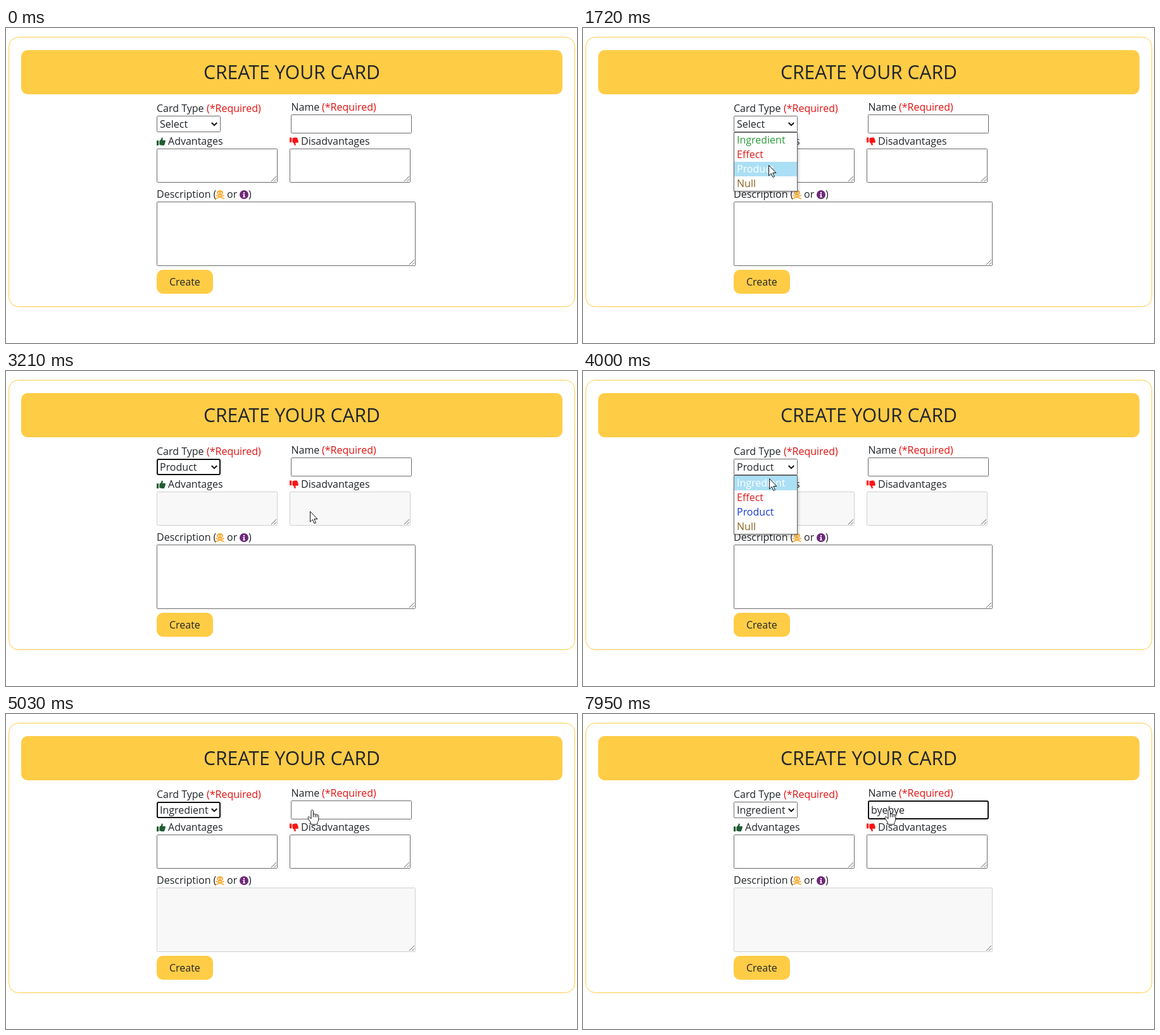
These frames come from a looping animation (902x499 px, 8000 ms). An HTML page:

```html
<!DOCTYPE html>
<html lang="en">
<head>
<meta charset="utf-8">
<title>Create your card</title>
<style>
html, body { margin: 0; height: 100%; overflow: hidden; background: #fff; }
svg { display: block; width: 902px; height: 499px; font: 16px "Open Sans", sans-serif; fill: #212529; }
.yellow { fill: #ffcc46; }
.red { fill: #e31212; }
.field { fill: #fff; stroke: #6b6b6b; }
.field.disabled { fill: #f8f8f8; stroke: #d0d0d0; }
.field.focus { stroke: #101014; stroke-width: 2; }
.grip { fill: none; stroke: #555; stroke-width: .9; }
.cursor { fill: #fff; stroke: #111; stroke-linejoin: round; }
</style>
</head>
<body>
<svg viewBox="0 0 902 499">
  <defs>
    <path id="thumb" d="M0 5.3h3.2V13H0zM4.4 6 7.1 3.3 7.8.4C9.5.2 10 1.4 9.8 2.6L9 4.8h3.8c1.3.2 1.5 1.6.7 2.2.4.9.1 1.7-.4 2 .2 1-.1 1.6-.7 1.9.1 1.2-.5 2.1-1.8 2.1H8.3C6.8 13 5.8 12.2 4.4 12z"/>
    <path id="grip" class="grip" d="M-10-2l8-8M-5.5-2l3.5-3.5"/>
  </defs>

  <rect x="4.5" y="14.5" width="894" height="427" rx="15" fill="#fff" stroke="#ffcc46"/>
  <rect class="yellow" x="24" y="35" width="855" height="70" rx="10"/>
  <text x="451.5" y="81" font-size="30.1" text-anchor="middle">CREATE YOUR CARD</text>

  <text x="238" y="133">Card Type</text>
  <text x="317" y="133" class="red">(*Required)</text>
  <text x="450.5" y="131">Name</text>
  <text x="499" y="131" class="red">(*Required)</text>

  <use href="#thumb" transform="translate(238 173)" fill="#1f5c33"/>
  <text x="256" y="185">Advantages</text>
  <use href="#thumb" transform="translate(448 186.5) scale(1 -1)" fill="#fb1414"/>
  <text x="466" y="185">Disadvantages</text>

  <text x="238" y="269">Description (</text>
  <g transform="translate(331 257)">
    <path d="M1 8.2l12 5M13 8.2l-12 5" stroke="#f8b040" stroke-width="2" stroke-linecap="round"/>
    <path d="M7 0c3.2 0 5 1.8 5 4 0 1.5-.8 2.5-2 3.2v1.3H4V7.200C2.800 6.500 2 5.500 2 4c0-2.200 1.800-4 5-4z" fill="#f8b040"/>
    <circle cx="5" cy="4.300" r="1.100" fill="#fff"/><circle cx="9" cy="4.300" r="1.100" fill="#fff"/>
  </g>
  <text x="349" y="269">or</text>
  <circle cx="376" cy="264" r="7" fill="#6e2a78"/>
  <path d="M375 260h2v2h-2zM374 263h3v4h1v1.300h-4V267h1.200v-2.700H374z" fill="#fff"/>
  <text x="383" y="269">)</text>

  <rect id="advantages" class="field" x="238.500" y="191.500" width="190" height="53" rx="1"/>
  <rect id="disadvantages" class="field" x="448.500" y="191.500" width="190" height="53" rx="1"/>
  <rect id="description" class="field" x="238.500" y="275.500" width="408" height="101" rx="1"/>
  <use href="#grip" x="429" y="245"/>
  <use href="#grip" x="639" y="245"/>
  <use href="#grip" x="647" y="377"/>

  <rect id="name" class="field"/>
  <text id="typed" x="455" y="158"></text>
  <rect id="caret" y="142" width="1" height="20"/>

  <rect id="select" class="field"/>
  <text id="choice" x="243" y="158"></text>
  <path d="M324.800 150l4.200 4.200 4.200-4.200" fill="none" stroke="#111" stroke-width="2"/>

  <rect class="yellow" x="238" y="383" width="89" height="38" rx="10"/>
  <text x="258" y="408">Create</text>

  <g id="list" style="filter: drop-shadow(1px 2px 2px #0004)">
    <rect x="238.500" y="165.500" width="100" height="93" fill="#fff" stroke="#666"/>
    <rect id="highlight" x="239" width="99" height="23" fill="#abdff5"/>
    <g id="options"></g>
  </g>

  <path id="arrow" class="cursor" d="M.5.500v16.500l3.800-3.600 2.700 6.100 2.500-1.100-2.700-5.900h5.200z"/>
  <path id="hand" class="cursor" d="M-2 1.600C-2-.500 1.400-.500 1.400 1.600V7.500c0-1.800 3-1.800 3 .3 0-1.600 2.800-1.400 2.800.600 0-1.400 2.600-1.200 2.600.900V15c0 3-2 4-2 6v2h-10.300v-2c0-2-4-6-4.500-8.500-.4-1.800 1.500-2.400 2.800-1L-2 14zM1.400 7.500v4M4.400 8v3.500M7.200 8.600v3"/>
</svg>
<script>
const LOOP = 8000;
const $ = id => document.getElementById(id);
const options = [["Ingredient", "#2a9a3a"], ["Effect", "#dc1c1c"], ["Product", "#1c3cd8"], ["Null", "#8c6420"]];
const optionTexts = options.map(([label], i) => {
  const text = document.createElementNS("http://www.w3.org/2000/svg", "text");
  text.textContent = label;
  text.setAttribute("x", 243);
  text.setAttribute("y", 183 + 23 * i);
  return $("options").appendChild(text);
});

// Pointer stops: time, x, y
const path = [
  [200, 390, 505], [970, 323, 162], [1110, 320, 159], [1280, 318, 160],
  [1850, 289, 225], [2530, 289, 225], [3140, 480, 222], [3530, 480, 222],
  [3800, 300, 153], [3880, 298, 155], [4000, 294, 170], [4210, 292, 178],
  [4350, 292, 178], [5030, 484, 152], [LOOP, 484, 152]
];
const keyTimes = [6570, 6710, 6900, 7160, 7300, 7430];
const between = (t, from, to) => t >= from && t < to;
const show = (id, visible) => $(id).style.display = visible ? "" : "none";

function set(id, attributes) {
  for (const key in attributes) $(id).setAttribute(key, attributes[key]);
}

function pointerAt(t) {
  const i = Math.max(1, path.findIndex(stop => stop[0] > t));
  const [t0, x0, y0] = path[i - 1], [t1, x1, y1] = path[i];
  const u = Math.min(1, Math.max(0, (t - t0) / (t1 - t0)));
  const k = u * u * (3 - 2 * u);
  return [Math.round(x0 + (x1 - x0) * k), Math.round(y0 + (y1 - y0) * k)];
}

// The focus ring lies inside the outer edge of the thin border.
function drawBox(id, x, y, width, height, focused) {
  const inset = focused ? 1 : .5;
  set(id, {
    x: x + inset, y: y + inset, width: width - 2 * inset, height: height - 2 * inset,
    rx: focused ? 2 : 1, class: focused ? "field focus" : "field"
  });
}

function draw(t) {
  const [x, y] = pointerAt(t);
  const choice = t < 2050 ? "Select" : t < 4350 ? "Product" : "Ingredient";
  const open = between(t, 1280, 2050) || between(t, 3880, 4350);
  const nameFocused = t >= 5160;

  drawBox("select", 238, 139, 101, 26, between(t, 2050, 3880) || between(t, 4350, 5160));
  drawBox("name", 450, 137, 191, 30, nameFocused);
  $("choice").textContent = choice;
  for (const id of ["advantages", "disadvantages"]) $(id).classList.toggle("disabled", choice === "Product");
  $("description").classList.toggle("disabled", choice === "Ingredient");

  const hovered = Math.floor((y - 166) / 23);
  show("list", open);
  show("highlight", hovered >= 0);
  set("highlight", { y: 166 + 23 * Math.max(0, hovered) });
  optionTexts.forEach((text, i) => text.style.fill = i === hovered ? "#fff" : options[i][1]);

  $("typed").textContent = "byebye".slice(0, keyTimes.filter(time => time <= t).length);
  set("caret", { x: 455 + Math.floor($("typed").getComputedTextLength()) - (t >= 6570 ? 1 : 0) });
  show("caret", nameFocused && !between(t, 5620, 6090) && t < 7950);

  const overName = between(x, 450, 641) && between(y, 137, 167);
  show("arrow", t >= 200 && !overName);
  show("hand", overName);
  set(overName ? "hand" : "arrow", { transform: `translate(${x} ${y})` });
}

function tick() {
  draw(performance.now() % LOOP);
  requestAnimationFrame(tick);
}
tick();
</script>
</body>
</html>
```
